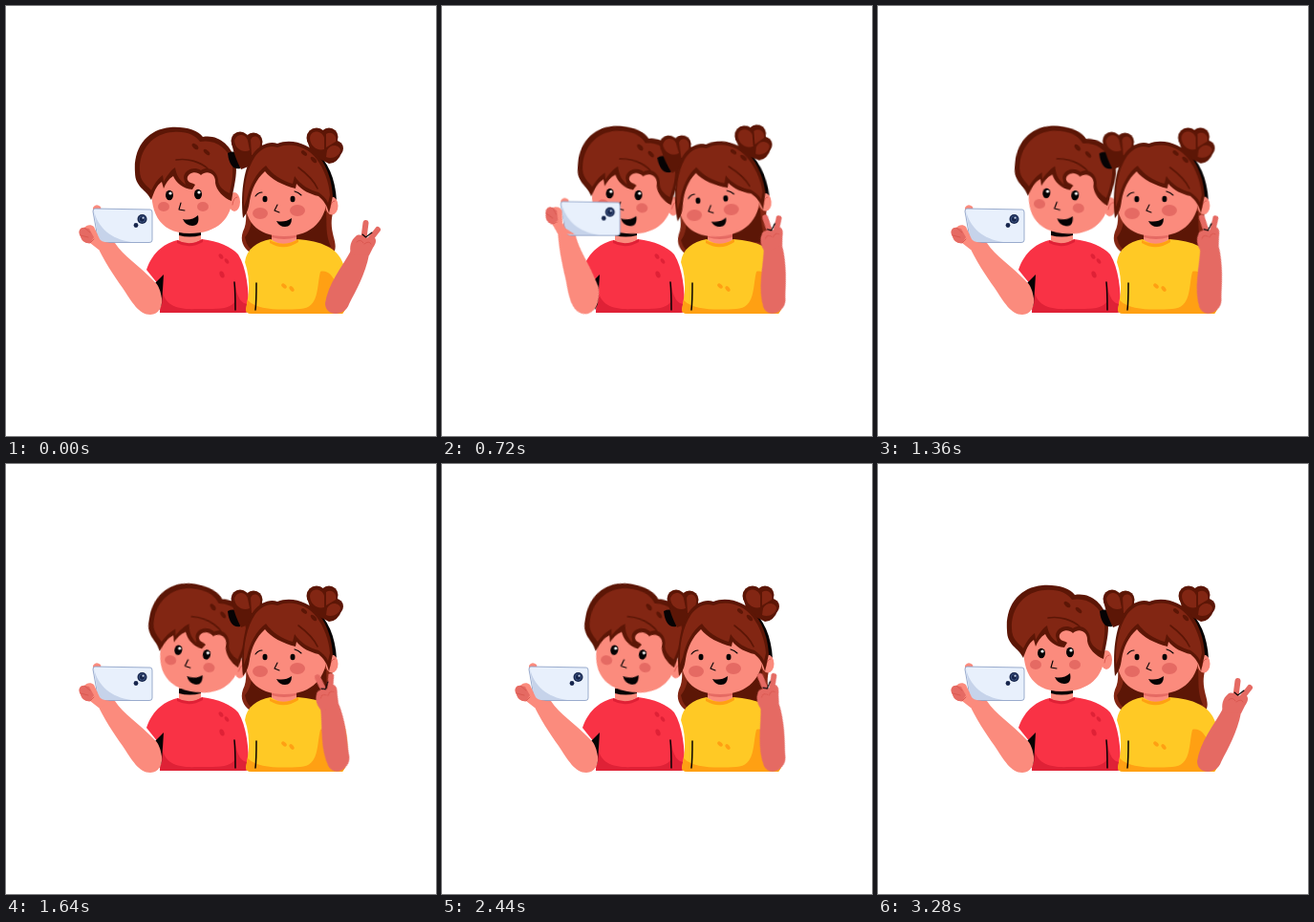
Animation of 450x450 px, one loop 3.32 s. Source, as an HTML page:

```html
<!DOCTYPE html>
<html lang="en">
<head>
<meta charset="utf-8">
<title>Selfie</title>
<style>
  html, body { margin: 0; width: 100%; height: 100%; overflow: hidden; background: #fff; }
  svg { display: block; width: 100vw; height: 100vh; }

  .hair { fill: #822613; }
  .dark { fill: #5c1606; }
  .skin { fill: #fb8b7d; }
  .shade { fill: #e56a63; }
  .ink { fill: #060304; }
  .line { fill: none; stroke: #060304; stroke-width: 1.5; stroke-linecap: round; stroke-linejoin: round; }
  .thin { stroke-width: 1.1; }
  .fold { fill: none; stroke: #d9564f; stroke-width: .9; stroke-linecap: round; }
  .strand { fill: none; stroke: #5c1606; stroke-width: 1.6; stroke-linecap: round; }
  .red { fill: #df2136; }
  .orange { fill: #ffa013; }

  .move { animation: 3320ms cubic-bezier(.33, 0, .67, 1) infinite; }
  #boy-head { transform-origin: 193px 245px; animation-name: boy-head; }
  #boy-arm, #boy-fingers { transform-origin: 152px 308px; animation-name: boy-arm; }
  #phone { animation-name: phone; }
  .girl-head { transform-origin: 291px 242px; animation-name: girl-head; }
  #girl-arm { transform-origin: 345px 308px; animation-name: girl-arm; }

  @keyframes boy-head {
    0%, 30%, 95%, 100% { transform: rotate(0deg); }
    15% { transform: rotate(9.5deg); }
    50%, 75% { transform: rotate(11deg); }
  }
  @keyframes boy-arm {
    0%, 40%, 100% { transform: rotate(0deg); }
    15% { transform: rotate(27deg); }
  }
  @keyframes phone {
    0%, 40%, 100% { transform: translate(0, 0); }
    15% { transform: translate(40.5px, -9px); }
  }
  @keyframes girl-head {
    0%, 43%, 100% { transform: rotate(0deg); }
    12%, 30% { transform: rotate(-4.5deg); }
  }
  /* swings in, waves three times, swings out */
  @keyframes girl-arm {
    0%, 85%, 100% { transform: rotate(0deg); }
    10%, 30%, 50%, 70% { transform: rotate(-34deg); }
    20%, 40%, 60% { transform: rotate(-25deg); }
  }
</style>
</head>
<body>
<svg viewBox="0 0 450 450" xmlns="http://www.w3.org/2000/svg">

  <!-- Boy: neck and shirt -->
  <path class="skin" d="M181 228H204V246Q193 254 181 247Z"/>
  <path class="ink" d="M181 235L204 236V240Q192 243 181 240Z"/>
  <path fill="#f93245" d="M180 245C167 248 154 256 147 276L163 296L161 321H249Q254 321 254 316C254 298 252 274 243 260C236 252 222 246 205 244Q192 253 180 245Z"/>
  <path class="red" d="M163 295C165 314 180 318 200 317C220 317 233 318 239 310L240 290Q242 312 254 312V316Q254 321 249 321H161Z"/>
  <path class="red" d="M179 245Q192 252 206 244V247Q192 255 179 248Z"/>
  <g class="red">
    <ellipse cx="225" cy="262" rx="2" ry="3" transform="rotate(-35 225 262)"/>
    <ellipse cx="231" cy="267" rx="1.8" ry="3" transform="rotate(-35 231 267)"/>
    <ellipse cx="226" cy="281" rx="2.4" ry="3.6" transform="rotate(-20 226 281)"/>
  </g>
  <path class="ink" d="M165 281Q158 288 154 292L160 318L163 312Z"/>
  <path class="line" d="M239 289C240 300 240 310 240 318"/>

  <!-- Boy: head -->
  <g id="boy-head" class="move">
    <ellipse class="skin" cx="239" cy="205" rx="6" ry="10"/>
    <path class="fold" d="M237 208Q238 200 242 200"/>
    <path class="skin" d="M153 185C150 212 158 238 192 238C222 238 236 222 237 200C238 175 215 150 190 150C165 152 154 165 153 185Z"/>
    <path class="dark" d="M152 203C147 192 135 190 135 174C133 148 148 129 172 127C188 126 201 130 206 137C222 134 236 146 240 162C243 175 238 190 236 204C228 201 220 193 219 185C220 175 210 171 204 177C198 171 188 176 190 182C192 186 196 185 198 187L195 192C185 191 178 185 175 178C170 181 167 186 165 191L163 184C157 188 155 195 152 203Z"/>
    <path class="hair" d="M152 193C147 187 140 184 140 172C139 150 154 133 175 132C189 131 198 135 203 142C219 139 232 149 236 162C239 174 236 187 234 196C227 193 222 188 222 182C221 172 211 167 204 172C196 167 186 172 186 180L188 187C181 182 178 176 177 169C171 173 168 179 165 184L164 177C157 182 155 188 152 193Z"/>
    <path class="strand" d="M178 161C190 159 203 163 211 170"/>
    <ellipse class="dark" cx="198" cy="147" rx="2.200" ry="4" transform="rotate(-48 198 147)"/>
    <ellipse class="dark" cx="210" cy="153" rx="2" ry="4" transform="rotate(-48 210 153)"/>
    <ellipse class="shade" cx="165" cy="210" rx="6" ry="5"/>
    <ellipse class="shade" cx="206" cy="210" rx="6" ry="5"/>
    <ellipse class="ink" cx="171" cy="198" rx="4" ry="5.300"/>
    <ellipse class="ink" cx="201" cy="197" rx="4" ry="5.300"/>
    <circle fill="#fff" cx="172" cy="196" r="1.600"/>
    <circle fill="#fff" cx="202" cy="195" r="1.600"/>
    <path class="line thin" d="M183 206L181 213L187 214"/>
    <path class="ink" d="M185 223Q194 225 201 219Q203 230 195 230Q188 230 185 223Z"/>
  </g>

  <!-- Boy: arm holding the phone -->
  <g id="boy-arm" class="move">
    <path class="skin" d="M95 250C102 266 112 281 122 295C132 310 139 323 151 323C160 323 164 314 163 306C162 299 160 293 156 289C140 272 122 261 114 248L100 240Z"/>
  </g>
  <g id="phone" class="move">
    <path class="skin" d="M91 216L91 211Q94 206 99 210L100 216Z"/>
    <path fill="#e8f0fc" stroke="#8398c0" stroke-width=".8" d="M93 212L151 213Q153 213 153 216L153 245Q153 247.500 150 247.500L102 247.500Q97 247 96 243L91 215Q91 212 93 212Z"/>
    <path fill="#c6d3ea" d="M92 214C96 232 110 244 131 247L102 247Q97 246.500 96.500 243Z"/>
    <circle cx="142.500" cy="223" r="5" fill="#17264d"/>
    <circle cx="142.500" cy="223" r="3.200" fill="none" stroke="#47608f" stroke-width=".8"/>
    <circle cx="143.500" cy="221.700" r="1" fill="#dce8fb"/>
    <circle cx="136" cy="229.500" r="2.400" fill="#17264d"/>
  </g>
  <g id="boy-fingers" class="move">
    <path class="skin" d="M114 249C107 247 101 248 98 244L92 231C89 228 84 229 82 232C77 231 75 237 78 241C79 246 84 249 88 248L97 255Z"/>
    <path class="shade" d="M82 232C77 231 75 237 78 241C79 246 84 249 88 248L92 242L87 233Z"/>
    <path class="fold" d="M82 232L88 237M78 240L86 242M88 248L92 244"/>
  </g>

  <!-- Girl: long hair behind the body -->
  <g class="girl-head move">
    <path class="hair" d="M252 172C246 200 256 220 248 236C244 247 250 257 262 261L328 257C336 260 342 260 344 256C347 247 339 238 341 222C344 206 343 190 341 180Z"/>
    <path class="dark" d="M250 242C256 235 258 226 257 212L335 215C336 230 334 238 340 252L300 246L262 258Q252 254 250 242Z"/>
  </g>

  <!-- Girl: neck and shirt -->
  <path class="skin" d="M278 230H304V247Q291 256 278 247Z"/>
  <path class="shade" d="M278 238H304V242Q291 246 278 242Z"/>
  <path fill="#ffc925" d="M277 244C262 247 252 254 250 268Q255 282 254 300L251 318Q252 322 257 322H352C358 318 360 288 353 270C347 253 330 246 305 244Q291 254 277 244Z"/>
  <path class="orange" d="M253 308C264 319 288 318 308 317C328 316 325 294 329 278C336 276 342 282 345 290L358 300Q357 317 352 322H257Q251 322 251 318Z"/>
  <path class="orange" d="M276 245Q291 253 306 244V247Q291 257 276 248Z"/>
  <ellipse class="orange" cx="291" cy="293" rx="2" ry="3.200" transform="rotate(-50 291 293)"/>
  <ellipse class="orange" cx="299" cy="296" rx="2" ry="3.200" transform="rotate(-40 299 296)"/>
  <path class="line" d="M262 290C262 300 262 310 261 318"/>

  <!-- Girl: head -->
  <g class="girl-head move">
    <path class="ink" d="M232 154Q240 150 245 157L245 170Q234 172 232 154Z"/>
    <path class="ink" d="M322 150Q344 168 346 204L337 204Z"/>
    <g class="dark">
      <circle cx="245" cy="141" r="9.500"/>
      <circle cx="259" cy="142" r="9.500"/>
      <path d="M236 144L268 145Q270 156 264 164L246 171Q240 160 236 144Z"/>
      <circle cx="325" cy="138" r="10.500"/>
      <circle cx="338" cy="137" r="9.500"/>
      <circle cx="345" cy="149" r="8"/>
      <path d="M315 140L342 130L352 152Q347 165 338 165L320 156Z"/>
    </g>
    <g class="hair">
      <path d="M239 141C241 133 251 133 253 141L255 151C248 154 240 150 239 141Z"/>
      <path d="M256 140C258 134 267 136 266 144C266 151 261 156 257 156Z"/>
      <path d="M318 138C319 129 331 130 333 138L333 150C325 152 318 146 318 138Z"/>
      <path d="M335 134C341 130 347 136 345 142L335 148Z"/>
      <path d="M336 151C340 143 350 146 350 151C349 157 341 161 335 158Z"/>
    </g>
    <ellipse class="skin" cx="341" cy="209" rx="6.500" ry="9.500"/>
    <path class="fold" d="M339 212Q340 204 344 204"/>
    <path class="skin" d="M250 195C248 225 262 241 291 241C322 241 335 222 336 200C335 170 310 160 285 162C262 165 252 178 250 195Z"/>
    <path class="dark" d="M248 222C245 192 250 168 259 154C266 145 276 141 284 144C298 138 318 144 328 158C337 170 341 184 342 199L338 217C336 209 333 204 327 199C318 197 310 193 304 186L303 191C290 188 277 181 271 173C262 181 257 192 255 204C254 212 252 217 248 222Z"/>
    <path class="hair" d="M249 210C248 190 252 170 261 157C268 148 276 145 284 148C298 142 315 147 325 160C333 171 338 184 339 198L337 206C335 201 331 198 327 195C318 193 308 187 302 178L300 186C289 183 278 176 272 167C262 174 255 188 252 202Z"/>
    <path class="strand" d="M306 169C314 175 322 182 326 191"/>
    <ellipse class="dark" cx="312" cy="154" rx="1.900" ry="3.600" transform="rotate(-50 312 154)"/>
    <ellipse class="dark" cx="322" cy="161" rx="2" ry="4" transform="rotate(-44 322 161)"/>
    <ellipse class="shade" cx="266" cy="217" rx="8" ry="6"/>
    <ellipse class="shade" cx="305" cy="214" rx="8" ry="6"/>
    <ellipse class="ink" cx="271" cy="202" rx="2.500" ry="3.200"/>
    <ellipse class="ink" cx="300" cy="202" rx="2.500" ry="3.200"/>
    <path class="line thin" d="M261 199Q264 195 268 195M302 194Q306 195 309 198"/>
    <path class="line thin" d="M284 208L281 214L286 216"/>
    <path class="ink" d="M283 225Q292 227 299 222Q299 231 292 231Q286 231 283 225Z"/>
  </g>

  <!-- Girl: arm with the V sign -->
  <g id="girl-arm" class="move">
    <path class="shade" d="M334 311C337 291 351 274 361 256L380 260C376 281 366 298 359 312C355 325 334 326 334 311Z"/>
    <g fill="none" stroke="#e56a63" stroke-width="6" stroke-linecap="round">
      <path d="M374 246L376.500 227"/>
      <path d="M378 248L389 234"/>
    </g>
    <path class="shade" d="M361 260C359 252 361 245 366 241C369 238 374 240 376 243L384 241C389 244 387 249 384 253L380 261Z"/>
    <path class="line thin" d="M373 239L376.500 242L383 237"/>
    <path class="fold" d="M367 247Q371 243 374 248M375 249Q380 245 382 249"/>
  </g>
</svg>
</body>
</html>
```
